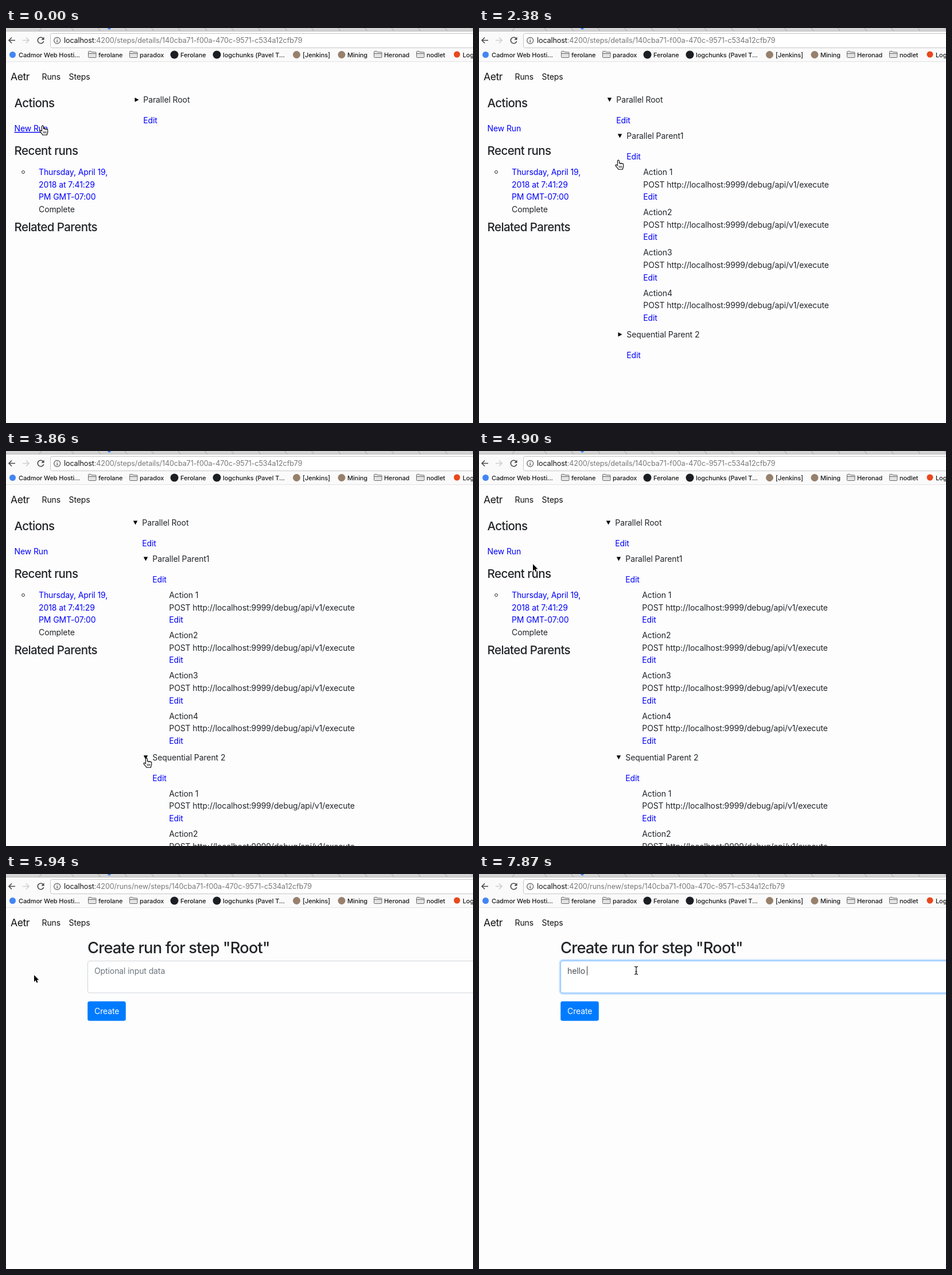
These frames come from a looping animation (814x688 px, 8000 ms). An HTML page:

```html
<!DOCTYPE html>
<html lang="en">
<head>
<meta charset="utf-8">
<title>Aetr</title>
<style>
  html, body { margin: 0; width: 100%; height: 100%; overflow: hidden; background: #fdfdfd; }
  svg { display: block; width: 814px; height: 688px; }
  text {
    font: 400 14px Inter, "Open Sans", sans-serif;
    font-optical-sizing: none;
    letter-spacing: -.1px;
    fill: #212529;
    white-space: pre;
  }
  .link { fill: #00f; }
  .h4 { font-size: 20.5px; font-weight: 500; letter-spacing: -.58px; }
  .h2 { font-size: 27.3px; font-weight: 500; letter-spacing: -.83px; }
  .brand { font-size: 17.5px; letter-spacing: -.4px; fill: #111; }
  .nav { fill: #111; }
  .url { font-size: 12.6px; letter-spacing: -.11px; fill: #777; }
  .host { fill: #111; }
  .mark { font-size: 11px; font-weight: 500; letter-spacing: -.1px; fill: #1c1c1c; }
  .hint { fill: #6c757d; }
  .input { fill: #495057; }
  .button { fill: #fff; }
  .hover { text-decoration: underline; }
</style>
</head>
<body>
<svg id="stage" viewBox="0 0 814 688" xmlns="http://www.w3.org/2000/svg"></svg>
<script>
const LOOP = 8000;
const UUID = '140cba71-f00a-470c-9571-c534a12cfb79';

const text = (x, y, str, cls = '', id = '') =>
  `<text x="${x}" y="${y}" class="${cls}" ${id && `id="${id}"`}>${str}</text>`;
const line = (d, color, width = 1) =>
  `<path d="${d}" fill="none" stroke="${color}" stroke-width="${width}"/>`;
const dot = (x, y, r, color) => `<circle cx="${x}" cy="${y}" r="${r}" fill="${color}"/>`;
const group = (id, body) => `<g id="${id}">${body}</g>`;

// Browser frame
function folder(x) {
  return `<path d="M${x + .5} 50.5v-9q0-1 1-1h4l1.5 1.5h6q1 0 1 1v7.5q0 1-1 1h-11.5q-1 0-1-1z
    M${x + .5} 44.5h13.5" fill="#e4e4e4" stroke="#6b6b6b"/>`;
}

function bookmarks() {
  const list = [
    [22, 'Cadmor Web Hosti...', dot(11.5, 46.5, 5.5, '#4285f4')],
    [161, 'ferolane', folder(143)],
    [233, 'paradox', folder(215)],
    [304, 'Ferolane', dot(293.5, 46.5, 7, '#1b1f23')],
    [378, 'logchunks (Pavel T...', dot(367.5, 46.5, 7, '#1b1f23')],
    [517, '[Jenkins]', dot(506.5, 46.5, 6.5, '#97806c')],
    [595, 'Mining', dot(585, 46.5, 6.5, '#97806c')],
    [659, 'Heronad', folder(641)],
    [733, 'nodlet', folder(715)],
    [796, 'Log', dot(786, 46, 5.5, '#e8481c')]
  ];
  return list.map(([x, name, icon]) => icon + text(x, 50.5, name, 'mark')).join('');
}

function browser() {
  let tabs = line('M58 5L62 0', '#a0a0a0');
  for (let x = 115; x < 814; x += 46.5) tabs += line(`M${x - 1} 0L${x + 3} 5`, '#a0a0a0');
  const url = (id, path) => text(101, 26.3,
    `<tspan class="host">localhost</tspan>:4200/${path}/${UUID}`, 'url', id);
  return `<rect width="814" height="59" fill="#fafafa"/>
    <rect width="814" height="5" fill="#d4d4d4"/>` + tabs +
    line('M0 5.5H814', '#b9b9b9') + dot(180, 0, 2.6, '#3b82f6') +
    line('M16 21.5H5M10 16.5L5 21.5L10 26.5', '#4a4a4a', 1.6) +
    line('M29 21.5H40M35 16.5L40 21.5L35 26.5', '#cfcfcf', 1.6) +
    line('M65 18.5A5.3 5.3 0 1 0 65.7 23', '#4a4a4a', 1.6) +
    '<path d="M66.5 15.5V20.7H61.3z" fill="#4a4a4a"/>' +
    '<rect x="77.5" y="9.5" width="760" height="25" rx="3" fill="#fff" stroke="#c6c6c6"/>' +
    line('M83.7 21.8a5.5 5.5 0 1 0 11 0a5.5 5.5 0 1 0-11 0', '#555', 1.2) +
    line('M89.2 21V25M89.2 18.4V19.8', '#555', 1.4) +
    url('urlDetails', 'steps/details') + url('urlNew', 'runs/new/steps') +
    bookmarks() + line('M0 58.5H814', '#e3e3e3') +
    text(8, 91, 'Aetr', 'brand') + text(62.5, 90, 'Runs', 'nav') + text(109.5, 90, 'Steps', 'nav');
}

// Step tree; level counts how many nodes have been opened
function node(x, y, name, open) {
  const d = open ? `M${x - 15.5} ${y - 8.5}h7.4l-3.7 7z` : `M${x - 14.8} ${y - 8.7}v7.4l7-3.7z`;
  return `<path d="${d}"/>` + text(x, y, name) + text(x, y + 35.8, 'Edit', 'link');
}

function actions(x, y) {
  return ['Action 1', 'Action2', 'Action3', 'Action4'].map((name, i) => {
    const top = y + i * 70.2;
    return text(x, top, name) +
      text(x, top + 21.6, 'POST http://localhost:9999/debug/api/v1/execute') +
      text(x, top + 43.2, 'Edit', 'link');
  }).join('');
}

function tree(level) {
  const x = level === 3 ? 237.3 : 239.3;
  let out = node(x, 130, 'Parallel Root', level > 0);
  if (level > 0) out += node(x + 18, 193, 'Parallel Parent1', level > 1);
  if (level > 1) out += actions(x + 47, 256);
  if (level > 0) out += node(x + 18, level > 1 ? 538.8 : 256, 'Sequential Parent 2', level > 2);
  if (level > 2) out += actions(x + 47, 601.8);
  return group('tree' + level, out);
}

function details() {
  return text(14.5, 137.5, 'Actions', 'h4') +
    group('ring', `<rect x="12" y="165" width="63.5" height="20.5" rx="2" fill="none"
      stroke="#a9d0f8" stroke-width="3"/><rect x="12.5" y="165.5" width="62.5" height="19.5"
      rx="1" fill="none" stroke="#559de6"/>`) +
    text(14.5, 180, 'New Run', 'link', 'newRun') +
    text(14.5, 220.5, 'Recent runs', 'h4') +
    '<circle cx="30" cy="251" r="2.4" fill="none" stroke="#212529"/>' +
    ['Thursday, April 19,', '2018 at 7:41:29', 'PM GMT-07:00', 'Complete']
      .map((s, i) => text(57, 256 + i * 21.6, s, i < 3 ? 'link' : '')).join('') +
    text(14.5, 353.5, 'Related Parents', 'h4') +
    [0, 1, 2, 3].map(tree).join('');
}

function form() {
  return text(142, 138, 'Create run for step "Root"', 'h2') +
    group('glow', `<rect x="141" y="150" width="760" height="58.5" rx="5" fill="none"
      stroke="#bfdeff" stroke-width="3"/>`) +
    '<rect id="box" x="142.5" y="151.5" width="757" height="55.5" rx="3.5" fill="#fff"/>' +
    text(154, 174, 'Optional input data', 'hint', 'hint') +
    text(154, 174, '', 'input', 'typed') +
    '<rect id="caret" y="160.5" width="1" height="16" fill="#333"/>' +
    '<rect x="142.2" y="221.8" width="66.6" height="34" rx="3.6" fill="#007bff"/>' +
    text(154, 244, 'Create', 'button');
}

const cursors =
  group('hand', `<path d="M-1.6 9.5V1.6a1.5 1.5 0 0 1 3 0V6a1.4 1.4 0 0 1 2.6.4a1.3 1.3 0 0 1 2.5.6
    a1.2 1.2 0 0 1 2.2.9V11c0 2-1.3 3-1.3 5.2H-.2C-.8 14-3.2 12.6-4.9 9.9c-.8-1.4.9-2.2 1.8-1.3z"
    fill="#fff" stroke="#000" stroke-width="1.1"/>` + line('M1.3 10V13.5M3.5 10V13.5M5.7 10V13.5', '#000', .9)) +
  group('arrow', `<path d="M0 0V11.8L2.7 9.2 4.6 13.4 6.5 12.6 4.7 8.5H8.4z"
    stroke="#fff" stroke-width="1.4" paint-order="stroke"/>`) +
  group('beam', line('M-3-6.8Q0-6.8 0-4.8V4.8Q0 6.8-3 6.8M3-6.8Q0-6.8 0-4.8M3 6.8Q0 6.8 0 4.8M-1.8 2H1.8', '#111', 1.2));

const stage = document.getElementById('stage');
stage.innerHTML = '<rect width="814" height="688" fill="#fdfdfd"/>' +
  browser() + group('details', details()) + group('form', form()) +
  group('click', '<circle cx="51" cy="175" r="9" fill="#fff" fill-opacity=".35" stroke="#333"/>') +
  group('cursor', cursors);

// Pointer: start time, x, y, shape
const path = [
  [0, 64, 170, 'hand'], [140, 70, 168, 'hand'], [290, 197, 133, 'arrow'],
  [440, 221, 124, 'arrow'], [590, 226, 119, 'hand'], [740, 227, 118, 'hand'],
  [1330, 233, 162, 'hand'], [1480, 237, 171, 'hand'], [1630, 241, 177, 'hand'],
  [1780, 244, 180, 'hand'], [1930, 245, 180, 'hand'],
  [2380, 243, 230, 'hand'], [2530, 239, 350, 'hand'], [2680, 237, 440, 'hand'],
  [2830, 236, 470, 'hand'], [3120, 238, 492, 'hand'], [3270, 242, 518, 'hand'],
  [3420, 244, 532, 'hand'], [3570, 245, 535, 'hand'],
  [4460, 158, 311, 'arrow'], [4600, 142, 230, 'arrow'],
  [4900, 94, 197, 'arrow'], [5050, 56, 179, 'hand'], [5200, 50, 176, 'hand'],
  [5790, 49, 176, 'arrow'], [6090, 92, 174, 'arrow'], [6240, 205, 170, 'beam'],
  [6390, 262, 168, 'beam'], [6530, 274, 168, 'beam']
];
const opened = [1030, 2230, 3720];
const keys = [7130, 7280, 7430, 7570, 7720, 7870];
const $ = id => document.getElementById(id);
const show = (id, on) => { $(id).style.display = on ? '' : 'none'; };
const passed = (times, t) => times.filter(s => t >= s).length;

function render(t) {
  const isForm = t >= 5940;
  show('details', !isForm);
  show('urlDetails', !isForm);
  show('form', isForm);
  show('urlNew', isForm);

  const level = passed(opened, t);
  for (let i = 0; i < 4; i++) show('tree' + i, i === level);
  const pressed = t >= 5790 && !isForm;
  show('ring', pressed);
  show('click', pressed);
  $('newRun').classList.toggle('hover', t < 290 || t >= 5050);

  const focus = t >= 6680 ? 1 : t >= 6530 ? .5 : 0;
  $('glow').style.opacity = focus;
  $('box').setAttribute('stroke', focus ? '#80bdff' : '#ced4da');
  const typed = 'hello '.slice(0, passed(keys, t));
  $('typed').textContent = typed;
  show('hint', !typed);
  show('caret', focus > 0);
  if (isForm) {
    const width = typed ? $('typed').getComputedTextLength() : 0;
    $('caret').setAttribute('x', Math.floor(153.5 + width));
  }

  const [, x, y, shape] = path[passed(path.map(p => p[0]), t) - 1];
  $('cursor').setAttribute('transform', `translate(${x} ${y})`);
  for (const id of ['hand', 'arrow', 'beam']) show(id, id === shape);
}

const start = performance.now();
function tick() {
  render((performance.now() - start) % LOOP);
  requestAnimationFrame(tick);
}
tick();
</script>
</body>
</html>
```
